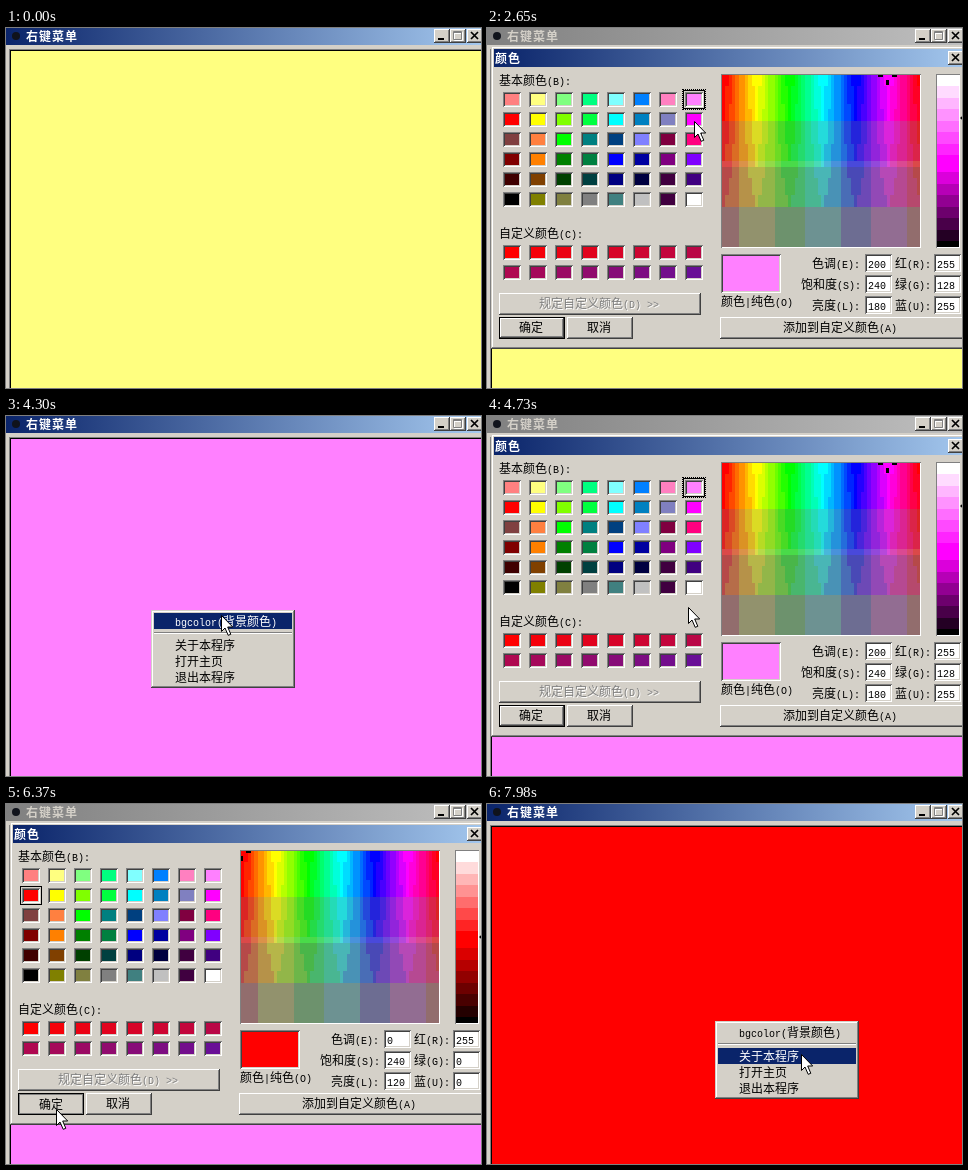
These frames come from a looping animation (475x360 px, 8000 ms). An HTML page with a canvas:

```html
<!DOCTYPE html>
<html lang="zh-CN">
<head>
<meta charset="utf-8">
<title>右键菜单</title>
<style>
html, body { margin: 0; width: 100%; height: 100%; overflow: hidden; background: #d4d0c8; }
div, canvas, svg { position: absolute; box-sizing: border-box; }
#stage { left: 0; top: 0; width: 475px; height: 360px; overflow: hidden; }
.text { font: 12px/16px "Noto Sans CJK SC", "Noto Sans CJK", sans-serif; height: 16px; white-space: pre; color: #000; }
.text span { font: 10px/16px "Liberation Mono", monospace; }
.title { font-weight: bold; letter-spacing: 1px; color: #fff; }
.off { color: #808080; text-shadow: 1px 1px #fff; }
.face { background: #d4d0c8; }
.raised { box-shadow: inset -1px -1px #404040, inset 1px 1px #fff, inset -2px -2px #808080; }
.window { box-shadow: inset -1px -1px #404040, inset 1px 1px #d4d0c8, inset -2px -2px #808080, inset 2px 2px #fff; }
.sunken { box-shadow: inset 1px 1px #808080, inset -1px -1px #fff, inset 2px 2px #404040, inset -2px -2px #d4d0c8; }
.edge { box-shadow: inset 1px 1px #808080, inset -1px -1px #fff; }
.default { border: 1px solid #000; }
.pressed { box-shadow: inset 0 0 0 1px #808080; }
.active { background: linear-gradient(90deg, #0a246a, #a6caf0 480px); }
.idle { background: linear-gradient(90deg, #808080, #c0c0c0 480px); }
</style>
</head>
<body>
<div id="stage"></div>
<script>
const stage = document.getElementById('stage');
const SVG = 'http://www.w3.org/2000/svg';

function box(parent, x, y, w, h, cls = '', fill = '') {
  const el = document.createElement('div');
  el.className = cls;
  el.style.cssText = `left:${x}px;top:${y}px;width:${w}px;height:${h}px`;
  if (fill) el.style.background = fill;
  return parent.appendChild(el);
}

// y is the middle of the line
function text(parent, x, y, str, cls = '') {
  const el = document.createElement('div');
  el.className = 'text ' + cls;
  el.style.left = x + 'px';
  el.style.top = y - 8 + 'px';
  el.innerHTML = str.replace(/[ -~]+/g, s => `<span>${s.replace(/>/g, '&gt;')}</span>`);
  return parent.appendChild(el);
}

function canvas(parent, x, y, w, h) {
  const el = document.createElement('canvas');
  el.width = w;
  el.height = h;
  el.style.cssText = `left:${x}px;top:${y}px`;
  parent.appendChild(el);
  return el.getContext('2d');
}

function drawing(parent, w, h, inner) {
  const el = document.createElementNS(SVG, 'svg');
  el.setAttribute('width', w);
  el.setAttribute('height', h);
  el.innerHTML = inner;
  return parent.appendChild(el);
}

const place = (el, x, y) => { el.style.transform = `translate(${x}px,${y}px)`; };
const show = (el, on) => { el.style.visibility = on ? 'inherit' : 'hidden'; };

// HSL colour reduced to eight levels per channel
function stepped(hue, sat, lum) {
  const rgb = [0, 8, 4].map(n => {
    const k = (n + hue / 30) % 12;
    const v = lum - sat * Math.min(lum, 1 - lum) * Math.max(-1, Math.min(k - 3, 9 - k, 1));
    return Math.round(Math.min(7, Math.floor(v * 8 + 1e-6)) * 255 / 7);
  });
  return `rgb(${rgb})`;
}

function captionButton(parent, x, y, glyph) {
  const b = box(parent, x, y, 16, 14, 'face raised');
  drawing(b, 16, 14, glyph);
}
const CROSS = '<path d="M4 3l7 7M11 3l-7 7" stroke="#000" stroke-width="1.7"/>';

// main window
const bar = box(stage, 0, 0, 475, 17, 'active');
box(bar, 6, 4, 8, 8, '', '#10131c').style.borderRadius = '50%';
const barText = text(bar, 20, 8, '右键菜单', 'title');
captionButton(bar, 428, 1, '<path d="M4 10h6" stroke="#000" stroke-width="2"/>');
captionButton(bar, 444, 1, '<path d="M4.5 3.5h8v8h-8zM4 4.5h9" fill="none" stroke="#fff"/><path d="M3.5 2.5h8v8h-8zM3 3.5h9" fill="none" stroke="#808080"/>');
captionButton(bar, 461, 1, CROSS);
box(stage, 3, 21, 480, 350, '', '#808080');
box(stage, 4, 22, 480, 350, '', '#000');
const field = box(stage, 5, 23, 480, 350);

// context menu
const menu = box(stage, 0, 0, 144, 78, 'face window');
const ROWS = [3, 27, 43, 59];
const items = ['bgcolor(背景颜色)', '关于本程序', '打开主页', '退出本程序'].map((label, i) => {
  const row = box(menu, 3, ROWS[i], 138, 16);
  return { row, label: text(row, 21, 8, label) };
});
box(menu, 3, 22, 138, 1, '', '#808080');
box(menu, 3, 23, 138, 1, '', '#fff');

// colour dialog, laid out in stage coordinates
const dialog = box(stage, 0, 0, 475, 360);
box(dialog, 4, 18, 480, 303, 'face window');
const head = box(dialog, 7, 21, 475, 18, 'active');
text(head, 1, 9, '颜色', 'title');
captionButton(dialog, 461, 23, CROSS);

function swatch(col, row, y0, fill) {
  const x = 16 + 26 * col, y = y0 + 20 * row;
  box(dialog, x, y, 18, 15, 'sunken', fill);
}

const PALETTE = `F88 FF8 8F8 0F8 8FF 08F F8C F8F
F00 FF0 8F0 0F4 0FF 08C 88C F0F
844 F84 0F0 088 048 88F 804 F08
800 F80 080 084 00F 00A 808 80F
400 840 040 044 008 004 404 408
000 880 884 888 488 CCC 404 FFF`;
text(dialog, 12, 52, '基本颜色(B):');
PALETTE.split('\n').forEach((line, r) => line.split(' ').forEach((code, c) =>
  swatch(c, r, 64, '#' + [...code].map(d => d === 'F' ? 'ff' : d + '0').join(''))));
text(dialog, 12, 205, '自定义颜色(C):');
for (let i = 0; i < 16; i++) swatch(i % 8, i >> 3, 217, `rgb(${255 - i * 10},${i},${i * 10})`);

const ring = box(dialog, 14, 62, 22, 19);
ring.style.border = '1px solid #000';
const focus = box(ring, -2, -2, 24, 21);
focus.style.border = '1px dotted #000';

function button(x, y, w, label, tx, cls = '', textCls = '') {
  const el = box(dialog, x, y, w, 22, 'face raised ' + cls);
  return { el, label: text(dialog, tx, y + 10, label, textCls) };
}
button(12, 265, 202, '规定自定义颜色(D) >>', 52, '', 'off');
const ok = button(12, 289, 66, '确定', 32, 'default');
button(80, 289, 66, '取消', 100);
button(233, 289, 250, '添加到自定义颜色(A)', 296);

// hue and saturation map
const SPEC = { x: 235, y: 47, w: 198, h: 172 };
box(dialog, 234, 46, 200, 174, 'edge');
const map = canvas(dialog, SPEC.x, SPEC.y, SPEC.w, SPEC.h);
for (let i = 0; i < 60; i++) {
  for (let j = 0; j < 30; j++) {
    const x = Math.round(i * SPEC.w / 60), y = Math.round(j * SPEC.h / 30);
    map.fillStyle = stepped(i * 6, 1 - j / 30, 0.5);
    map.fillRect(x, y, 4, 6);
  }
}
const clip = box(dialog, SPEC.x, SPEC.y, SPEC.w, SPEC.h);
clip.style.overflow = 'hidden';
const mark = box(clip, 0, 0, 0, 0);
box(mark, -9, -1, 5, 3, '', '#000');
box(mark, 5, -1, 5, 3, '', '#000');
box(mark, -1, 5, 3, 5, '', '#000');

// brightness strip
box(dialog, 449, 46, 24, 174, 'edge');
const strip = canvas(dialog, 450, SPEC.y, 22, SPEC.h);
const pointer = drawing(dialog, 6, 9, '<path d="M0 4.5L5 0V9z"/>');

const preview = box(dialog, 234, 226, 60, 39, 'sunken');
text(dialog, 234, 273, '颜色|纯色(O)');

const LABELS = [
  ['色调(E):', 325], ['饱和度(S):', 314], ['亮度(L):', 325],
  ['红(R):', 408], ['绿(G):', 408], ['蓝(U):', 408]
];
const values = LABELS.map(([label, x], i) => {
  const y = 235 + 21 * (i % 3), fx = i < 3 ? 378 : 447;
  text(dialog, x, y, label);
  box(dialog, fx, y - 9, 27, 18, 'sunken', '#fff');
  return text(dialog, fx + 3, y, '0').firstChild;
});

// hue, sat, lum (0-240), r, g, b, swatch column, swatch row
const COLORS = {
  yellow: [40, 240, 180, 255, 255, 128, 1, 0],
  pink: [200, 240, 180, 255, 128, 255, 7, 0],
  red: [0, 240, 120, 255, 0, 0, 0, 1]
};
const css = name => `rgb(${COLORS[name].slice(3, 6)})`;

let picked = '';
function pick(name) {
  if (name === picked) return;
  picked = name;
  const [hue, sat, lum, , , , col, row] = COLORS[name];
  place(ring, col * 26, row * 20);
  place(mark, Math.round(hue / 240 * SPEC.w), Math.round((1 - sat / 240) * SPEC.h));
  place(pointer, 473, SPEC.y + Math.round((1 - lum / 240) * SPEC.h) - 4.5);
  preview.style.background = css(name);
  values.forEach((el, i) => { el.textContent = COLORS[name][i]; });
  for (let j = 0; j < 30; j++) {
    strip.fillStyle = stepped(hue * 1.5, sat / 240, 1 - j / 30);
    strip.fillRect(0, Math.round(j * SPEC.h / 30), 22, 6);
  }
}

// pointers
const arrow = drawing(stage, 13, 22,
  '<path d="M.5.5v16l3.5-3.5 3.2 7.3 2.6-1-3.1-7.3h5z" fill="#fff" stroke="#000"/>');
const glass = drawing(stage, 13, 22,
  '<path d="M2.5 3v4l3 4-3 4v4h8v-4l-3-4 3-4v-4z" fill="#fff" stroke="#000"/>' +
  '<path d="M.5.5h12v2h-12zM.5 19.5h12v2h-12z" fill="#fff" stroke="#000"/>' +
  '<path d="M4 6.5h5M5 8.5h3M6 14.5h1M5 16.5h3M4 18.5h5" stroke="#000" stroke-dasharray="1 1"/>');
place(glass, 207, 156);

// start, last step, number of steps, x, y reached
const MOVES = [
  [420, 770, 7, 125, 152],
  [1140, 1320, 4, 213, 166],
  [2110, 2460, 7, 207, 72],
  [2650, 2650, 1, 207, 93],
  [2700, 3110, 8, 64, 300],
  [3470, 3820, 6, 145, 193],
  [4060, 4300, 4, 215, 199],
  [4730, 5420, 13, 31, 96],
  [5600, 6310, 11, 50, 305],
  [6490, 6720, 5, 228, 217],
  [6780, 6900, 3, 294, 216],
  [7210, 7210, 1, 291, 218],
  [7450, 7980, 9, 314, 250]
];
const MENUS = [[770, 1560, 122, 153], [3820, 4360, 145, 194], [6720, 8000, 228, 217]];
const DIALOGS = [[1620, 3230], [4360, 6430]];
const PRESSES = [[3170, 3230], [6370, 6430]];
const BACK = [[0, 'yellow'], [3230, 'pink'], [6430, 'red']];
const PICKS = [[0, 'yellow'], [2460, 'pink'], [5540, 'red']];

const during = (list, t) => list.find(s => t >= s[0] && t < s[1]);
const latest = (list, t) => list.filter(s => t >= s[0]).pop()[1];

function pointerAt(t) {
  let x = 185, y = 360;
  for (const [t0, t1, n, tx, ty] of MOVES) {
    if (t < t0) break;
    const k = t >= t1 ? n : Math.floor((t - t0) / (t1 - t0) * (n - 1) + 1e-6) + 1;
    x += (tx - x) * k / n;
    y += (ty - y) * k / n;
    if (k < n) break;
  }
  return [Math.round(x), Math.round(y)];
}

function render(t) {
  const [x, y] = pointerAt(t);
  const busy = t >= 1560 && t < 1620;
  place(arrow, x, y);
  show(arrow, !busy);
  show(glass, busy);

  field.style.background = css(latest(BACK, t));
  const open = during(DIALOGS, t);
  show(dialog, open);
  bar.className = open ? 'idle' : 'active';
  barText.style.color = open ? '#d4d0c8' : '#fff';
  pick(latest(PICKS, t));

  const down = during(PRESSES, t);
  ok.el.className = 'face default ' + (down ? 'pressed' : 'raised');
  place(ok.label, down ? 1 : 0, down ? 1 : 0);
  show(focus, !down);

  const m = during(MENUS, t);
  show(menu, m);
  if (!m) return;
  place(menu, m[2], m[3]);
  const inside = x >= m[2] + 3 && x < m[2] + 141;
  items.forEach(({ row, label }, i) => {
    const dy = y - m[3] - ROWS[i];
    const lit = inside && dy >= 0 && dy < 16;
    row.style.background = lit ? '#0a246a' : '';
    label.style.color = lit ? '#fff' : '#000';
  });
}

const start = performance.now();
function tick(now) {
  render(Math.max(0, now - start) % 8000);
  requestAnimationFrame(tick);
}
render(0);
requestAnimationFrame(tick);
</script>
</body>
</html>
```
